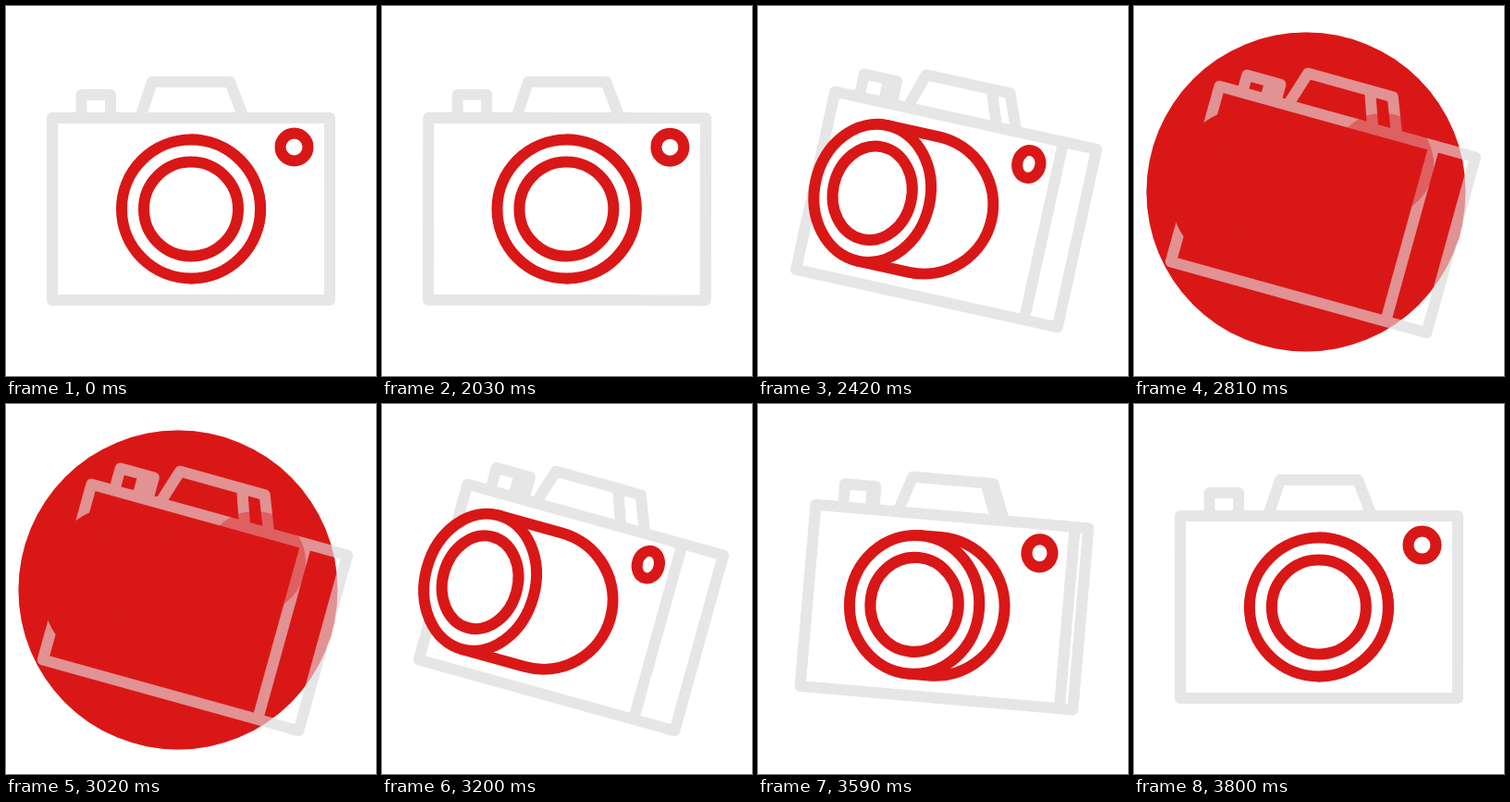
Recreate the animation shown at these times as an HTML page. Size 400x400 px, loop 3830 ms.

```html
<!DOCTYPE html>
<html lang="en">
<head>
<meta charset="utf-8">
<title>Camera</title>
<style>
  html, body { margin: 0; width: 100%; height: 100%; overflow: hidden; background: #fff; }
  svg { display: block; width: 100vw; height: 100vh; }
  .line { fill: none; stroke-width: 12; stroke-linecap: round; stroke-linejoin: round; }
  .body { stroke: #e6e6e6; }
  .lens { stroke: #d91717; fill: #fff; }
  .flash { fill: #d91717; }
  .veil { opacity: .405; }
</style>
</head>
<body>
<svg viewBox="0 0 400 400">
  <circle class="flash" cx="186" cy="201" r="172.5"/>
  <g class="turn"><path id="body" class="line body"/></g>
  <circle class="flash veil" cx="186" cy="201" r="172.5"/>
  <circle class="flash veil" cx="269" cy="171" r="55"/>
  <g class="turn">
    <path id="barrel" class="line lens"/>
    <ellipse id="rim" class="line lens" cy="0" ry="75"/>
    <ellipse id="glass" class="line lens" cy="0" ry="51"/>
    <ellipse id="dot" class="line lens" cy="-67" ry="15"/>
  </g>
</svg>
<script>
const LOOP = 3830, STEP = 30, OFFSET = 20;
const OPEN = [2000, 2595], PRESS = [2595, 2800], RELEASE = [2800, 3200], CLOSE = [3225, 3815];
const FLASH = [2780, 3050];
const TILT = 15.5, SQUEEZE = .205, EDGE = 98.5;

const $ = id => document.getElementById(id);
const turns = document.querySelectorAll('.turn');
const lenses = document.querySelectorAll('.lens');
const flashes = document.querySelectorAll('.flash');

const span = (t, [a, b]) => Math.min(1, Math.max(0, (t - a) / (b - a)));
const sine = x => (1 - Math.cos(Math.PI * x)) / 2;
const easeOut = x => 1 - (1 - x) ** 3;

function set(el, attrs) {
  for (const k in attrs) el.setAttribute(k, attrs[k]);
}

// Coordinates are relative to the centre of the body; p is the amount of turn.
function bodyPath(p, press) {
  const mix = (a, b) => a + (b - a) * p;
  const left = mix(-150, -143.5), right = -left, fold = mix(150, 97.5);
  const keyL = mix(-118.5, -118), keyF = mix(-87, -92), keyR = mix(-87, -80.5);
  const keyTop = mix(-123.5, -124) + press;
  const hood = -137.5, hoodF = mix(42, 14.5), hoodR = mix(42, 40);
  return `M${left} ${-EDGE}H${right}V${EDGE}H${left}Z M${fold} ${-EDGE}V${EDGE}` +
    `M${keyL} ${-EDGE}V${keyTop}H${keyR}V${-EDGE} M${keyF} ${keyTop}V${-EDGE}` +
    `M${mix(-55, -67)} ${-EDGE}L${mix(-42, -55)} ${hood}H${hoodR}L${mix(57, 55.5)} ${-EDGE}` +
    `M${hoodF} ${hood}L${mix(57, 28.5)} ${-EDGE}`;
}

function draw(time) {
  const t = Math.floor((time - OFFSET) / STEP) * STEP + OFFSET;
  const p = sine(span(t, OPEN)) - sine(span(t, CLOSE));
  const press = 6.5 * (sine(span(t, PRESS)) - easeOut(span(t, RELEASE)));
  const lit = t >= FLASH[0] && t < FLASH[1];
  const wide = 1 - SQUEEZE * p;
  const front = -102 * p, base = -31 * p;

  turns.forEach(g => set(g, {
    transform: `translate(${200 + 4.4 * p} ${219.5 + .5 * p}) rotate(${TILT * p})`
  }));
  set($('body'), { d: bodyPath(p, press) });
  set($('barrel'), { d: `M${front} -75H${base}A75 75 0 0 1 ${base} 75H${front}Z` });
  set($('rim'), { cx: front, rx: 75 * wide });
  set($('glass'), { cx: front, rx: 51 * wide });
  set($('dot'), { cx: 111.5 - 43.5 * p, rx: 15 * wide });

  flashes.forEach(el => { el.style.display = lit ? '' : 'none'; });
  lenses.forEach(el => { el.style.fill = lit ? '#d91717' : ''; });
}

const start = performance.now();
function tick() {
  draw((performance.now() - start) % LOOP);
  requestAnimationFrame(tick);
}
tick();
</script>
</body>
</html>
```
